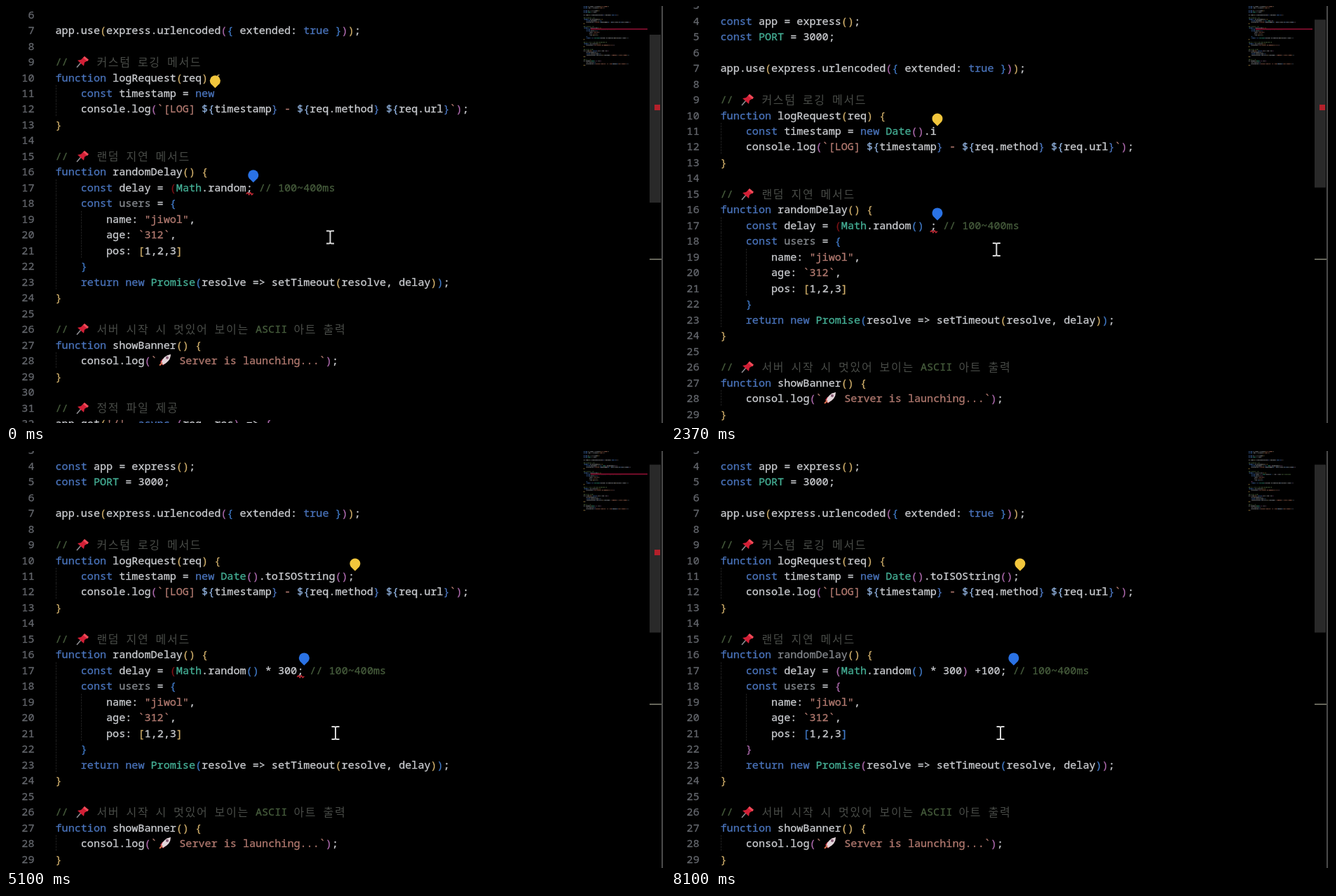
Animation, 940 px wide and 596 px high, one loop 8210 ms. Source, as an HTML page with a canvas:

```html
<!DOCTYPE html>
<html lang="ko">
<head>
<meta charset="utf-8">
<title>Two cursors in a code editor</title>
<style>
  html, body { margin: 0; width: 100%; height: 100%; overflow: hidden; background: #000; }
  #stage { position: relative; width: 940px; height: 596px; overflow: hidden; background: #000;
    font: 500 15.12px/22.48px "Noto Sans Mono", "DejaVu Sans Mono", monospace; color: #cbcdd1; }
  #stage svg { overflow: visible; }
  #code, #mouse, .pin, #squiggle { position: absolute; left: 0; top: 0; }
  #rows { position: absolute; left: 0; top: -.8px; -webkit-text-stroke: .3px; }
  .row { position: absolute; left: 70.5px; height: 22.48px; white-space: pre; font-variant-ligatures: none; }
  .num { position: absolute; right: 100%; margin-right: 30px; color: #64676d; }
  .guide { position: absolute; top: 0; width: 1px; height: 100%;
    background: repeating-linear-gradient(#202020 0 2px, #0a0a0a 2px 4px); }
  .kw { color: #4a74bc; }
  .mark { color: #8fb0dc; }
  .type { color: #45b096; }
  .str { color: #b27a70; }
  .note { color: #465c3c; }
  .mute { color: #85898e; }
  .b0 { color: #cdac69; }
  .b1 { color: #ac69ac; }
  .b2 { color: #4079c6; }
  .bad { color: #7c1216; }
  .ko { position: relative; top: .6px; font: 400 16px/0 "Noto Sans CJK KR", "Noto Sans KR", sans-serif;
    letter-spacing: 1.75px; color: #484b47; -webkit-text-stroke: 0; }
  .icon { display: inline-block; width: 22.6px; height: 14px; line-height: 0; vertical-align: -2px; }
  .icon svg { display: block; }
  #map { position: absolute; left: 824px; top: 0; opacity: .85; }
  #stage i { position: absolute; }
  #thumb { left: 918px; top: 0; width: 16px; height: 240px; background: #292929; }
  #edge { left: 935px; top: 0; width: 2px; height: 596px; background: #4b4b4b; }
  #tick { left: 918px; top: 361px; width: 17px; height: 2px; background: #66665a; }
  #mark { left: 925px; top: 141px; width: 8px; height: 8px; background: #b3202a; }
  #mapError { left: 834px; top: 32px; width: 81px; height: 2px; background: #700c28; }
</style>
</head>
<body>
<div id="stage">
  <div id="code">
    <div id="rows"></div>
    <svg id="squiggle" width="1" height="1"><path d="M0 2l2-2 2 3 2-3 2 3 2-2" fill="none" stroke="#c22a36" stroke-width="1.5"/></svg>
    <svg class="pin" id="yellow" width="1" height="1" fill="#f2c63c"><path d="M0 10.5L-6 4.5A7.5 7.5 0 1 1 6 4.5Z"/></svg>
    <svg class="pin" id="blue" width="1" height="1" fill="#2a72e4"><path d="M0 10.5L-6 4.5A7.5 7.5 0 1 1 6 4.5Z"/></svg>
  </div>
  <canvas id="map" width="92" height="92"></canvas>
  <i id="mapError"></i>
  <i id="thumb"></i><i id="mark"></i><i id="tick"></i><i id="edge"></i>
  <svg id="mouse" width="1" height="1" fill="none" stroke="#d8d8d8" stroke-width="2">
    <path d="M-5.5 -9H-2Q0 -9 0 -7Q0 -9 2 -9H5.5M0 -7V7M-5.5 9H-2Q0 9 0 7Q0 9 2 9H5.5"/>
  </svg>
</div>
<script>
const LOOP = 8210, CHAR = 9.072, LINE = 22.48, LEFT = 70.5;
const $ = id => document.getElementById(id);

const source = [
  "const express = require('express');",
  "const path = require('path');",
  "",
  "const app = express();",
  "const PORT = 3000;",
  "",
  "app.use(express.urlencoded({ extended: true }));",
  "",
  "// 📌 커스텀 로깅 메서드",
  "function logRequest(req) {",
  "    const timestamp = new",
  "    console.log(`[LOG] ${timestamp} - ${req.method} ${req.url}`);",
  "}",
  "",
  "// 📌 랜덤 지연 메서드",
  "function randomDelay() {",
  "    const delay = (Math.random",
  "    const users = {",
  "        name: \"jiwol\",",
  "        age: `312`,",
  "        pos: [1,2,3]",
  "    }",
  "    return new Promise(resolve => setTimeout(resolve, delay));",
  "}",
  "",
  "// 📌 서버 시작 시 멋있어 보이는 ASCII 아트 출력",
  "function showBanner() {",
  "    consol.log(`🚀 Server is launching...`);",
  "}",
  "",
  "// 📌 정적 파일 제공",
  "app.get('/', async (req, res) => {",
  "    logRequest(req);",
  "    await randomDelay();",
  "    res.sendFile(path.join(__dirname, 'public', 'index.html'));",
  "});",
  "",
  "// 📌 서버 실행",
  "app.listen(PORT, () => {",
  "    showBanner();",
  "    console.log(`Server running on port ${PORT} and waiting`);",
  "});"
];

// time, text typed by yellow, text typed by blue, shift of the blue pin
const steps = [
  [0, "", "", 0],
  [200, " ", "", 0],
  [400, " D", "", 0],
  [570, " Da", "", 0],
  [730, " Dat", "(", 0],
  [870, " Date", "()", -1],
  [1000, " Date(", "()", -1],
  [1270, " Date()", "()", -1],
  [1600, " Date().", "() ", 0],
  [2170, " Date().i", "() ", 0],
  [2500, " Date().is", "() ", 0],
  [2770, " Date().iso", "() ", 0],
  [3430, " Date().iso", "() *", 0],
  [3600, " Date().iso", "() * ", 0],
  [3770, " Date().toISOString", "() * 3", 0],
  [3930, " Date().toISOString", "() * 30", 0],
  [4070, " Date().toISOString", "() * 300", 0],
  [4200, " Date().toISOString(", "() * 3000", 1],
  [4330, " Date().toISOString()", "() * 3000", 1],
  [4600, " Date().toISOString();", "() * 3000", 1],
  [4870, " Date().toISOString();", "() * 300", 0],
  [5300, " Date().toISOString();", "() * 300)", 0],
  [5700, " Date().toISOString();", "() * 300) ", 0],
  [6030, " Date().toISOString();", "() * 300) +", 0],
  [6230, " Date().toISOString();", "() * 300) +1", 0],
  [6400, " Date().toISOString();", "() * 300) +10", 0],
  [6570, " Date().toISOString();", "() * 300) +100", 1],
  [6900, " Date().toISOString();", "() * 300) +100", 1]
];

const tokenRule = /(?<note>\/\/.*)|(?<tpl>`[^`]*`)|(?<str>"[^"]*"|'[^']*')|\b(?<kw>const|function|new|return|true|async|await)\b|\b(?<type>Math|Promise|Date|PORT)\b|(?<open>[(\[{])|(?<close>[)\]}])|\w+|\s+|./gu;

const icons = {
  "📌": '<span class="icon"><svg width="22" height="14"><path d="M9 8L3 15" stroke="#8d8d92" stroke-width="1.6"/><path d="M4 5L9 4L13 0L19 5L14 8L13 13Z" fill="#d21f36"/><path d="M13 0L19 5" stroke="#ef4a58" stroke-width="3"/></svg></span>',
  "🚀": '<span class="icon"><svg width="22" height="14"><path d="M4 9L7 5L10 4L11 11L8 14Z" fill="#c3283c"/><path d="M5 11Q8 0 19 -2Q19 8 8 13Z" fill="#e3d5da"/><circle cx="14" cy="3" r="2" fill="#8a5f78"/><path d="M3 14L7 10" stroke="#d86a4a" stroke-width="2"/></svg></span>'
};

// Splits the lines into [class, text] pairs; brackets are coloured by depth.
function tokenize(lines, closed, clean) {
  let depth = 0;
  return lines.map((line, n) => {
    if (line[0] === "}") depth = 1;
    const out = [];
    for (const m of line.matchAll(tokenRule)) {
      const g = m.groups, text = m[0];
      if (g.tpl) {
        text.split(/(\$\{[^}]*\})/).forEach((part, i) => {
          if (i % 2) out.push(["mark", "${"], ["", part.slice(2, -1)], ["kw", "}"]);
          else out.push(["str", part]);
        });
      } else if (g.open) {
        const bad = n === 16 && depth === 1 && !closed;
        out.push([bad ? "bad" : "b" + depth % 3, text]);
        depth++;
      } else if (g.close) {
        depth = Math.max(0, depth - 1);
        out.push(["b" + depth % 3, text]);
      } else {
        const mute = text === "users" || (clean && n === 15 && text === "randomDelay");
        const cls = ["note", "str", "kw", "type"].find(k => g[k]);
        out.push([cls || (mute ? "mute" : ""), text]);
      }
    }
    return out;
  });
}

const rows = source.map((line, n) => {
  const row = document.createElement("div");
  row.className = "row";
  row.style.top = n * LINE + "px";
  const depth = line.search(/\S|$/) / 4;
  let html = `<span class="num">${n + 1}</span>`;
  for (let i = 0; i < depth; i++) html += `<b class="guide" style="left:${i * 4 * CHAR}px"></b>`;
  row.innerHTML = html + "<span></span>";
  $("rows").append(row);
  return row.lastChild;
});

const toHtml = tokens => tokens.map(([cls, text]) => {
  const body = text.replace(/[가-힣]+/g, "<span class=ko>$&</span>").replace(/📌|🚀/gu, e => icons[e]);
  return `<span class="${cls}">${body}</span>`;
}).join("");

const tints = { kw: "#4b79bd", mark: "#8fb0dc", type: "#3fb795", str: "#bd7c66", note: "#5d7d4c",
  mute: "#85898e", b0: "#d3ab52", b1: "#b467b0", b2: "#3b7fd0", bad: "#c22a36" };
const ctx = $("map").getContext("2d");

function drawMap(all) {
  ctx.clearRect(0, 0, 92, 92);
  all.forEach((tokens, n) => {
    let x = 0;
    for (const [cls, text] of tokens) {
      ctx.fillStyle = tints[cls] || "#a9adb2";
      for (const c of text) {
        ctx.globalAlpha = /[.,;:'`-]/.test(c) ? .35 : .55 + .3 * Math.sin(c.charCodeAt(0) * 7);
        if (c !== " ") ctx.fillRect(x, n * 2.05, 1.02, 1.4);
        x += 1.03;
      }
    }
  });
}

const place = (el, x, y) => { el.style.transform = `translate(${x}px,${y}px)`; };
const midY = n => (n - .5) * LINE;

function showStep(index) {
  const [, typed, math, shift] = steps[index];
  const closed = math.includes("300)");
  const clean = index === steps.length - 1;
  const lines = source.slice();
  lines[10] += typed;
  lines[16] += math + ";";
  const end = lines[16].length;
  const yellowCol = lines[10].length;
  lines[16] += " // 100~400ms";
  const all = tokenize(lines, closed, clean);
  all.forEach((tokens, n) => {
    const html = toHtml(tokens);
    if (rows[n].cache !== html) rows[n].innerHTML = rows[n].cache = html;
  });
  drawMap(all);
  place($("yellow"), LEFT + yellowCol * CHAR + 1, midY(11) - 18);
  place($("blue"), LEFT + (end + shift) * CHAR + 1, midY(17) - 18);
  place($("squiggle"), LEFT + (end - 1) * CHAR, midY(17) + 7);
  for (const id of ["squiggle", "mark", "mapError"]) $(id).style.visibility = clean ? "hidden" : "visible";
}

const span = (t, from, to) => Math.min(1, Math.max(0, (t - from) / (to - from)));
const ease = p => p * p * (3 - 2 * p);
const start = performance.now();
let current = -1;

function frame() {
  const t = (performance.now() - start) % LOOP;
  const index = steps.findLastIndex(s => s[0] <= t);
  if (index !== current) showStep(current = index);
  const scroll = ease(span(t, 30, 600));
  place($("code"), 0, -111.2 + 54.2 * scroll);
  place($("thumb"), 0, 41 - 21.5 * scroll);
  const move = ease(span(t, 2170, 2800));
  place($("mouse"), 462.5 + 7.5 * move, 330.5 + 72.5 * move);
  requestAnimationFrame(frame);
}
frame();
</script>
</body>
</html>
```
